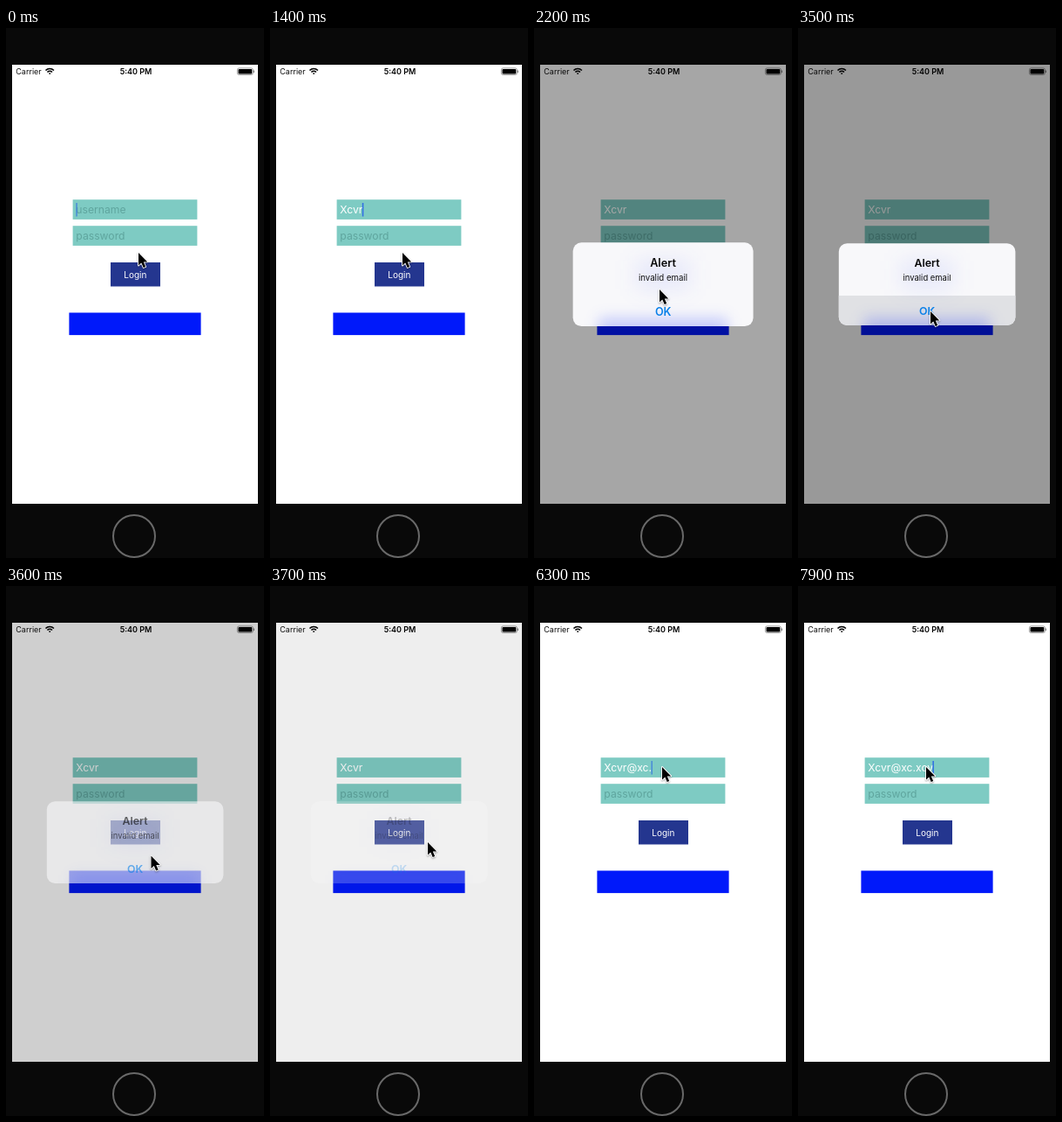
These frames come from a looping animation (296x606 px, 8000 ms). An HTML page with a canvas:

```html
<!DOCTYPE html>
<html lang="en">
<head>
<meta charset="utf-8">
<title>Login form</title>
<style>
html, body { margin: 0; width: 100%; height: 100%; overflow: hidden; background: #090909; }
canvas { display: block; width: 296px; height: 606px; }
</style>
</head>
<body>
<canvas id="stage"></canvas>
<script>
const W = 296, H = 606, LOOP = 8000, STEP = 100;
const canvas = document.getElementById('stage');
const ctx = canvas.getContext('2d');
const dpr = window.devicePixelRatio || 1;
canvas.width = W * dpr;
canvas.height = H * dpr;

const FONT = 'Inter, "Liberation Sans", sans-serif';
const USER = 'Xcvr@xc.xcv';

// Typing comes in bursts of [start, letters], one letter each KEY_GAP ms
const KEY_GAP = 50;
const bursts = [[100, 4], [5600, 1], [5950, 2], [6300, 1], [6600, 3]];
const keyTimes = bursts.flatMap(([start, n]) => Array.from({ length: n }, (_, i) => start + i * KEY_GAP));
const BLUR = 2000, FOCUS = 4400;
const ALERT = { open: 1900, tap: 3400, close: 3500 };

// Pointer stops: time, x, y
const stops = [[1600, 152, 256], [2200, 144, 298], [3500, 152, 323], [3700, 181, 292], [4000, 143, 209], [4200, 147, 206]];

const clamp = v => Math.min(1, Math.max(0, v));
const easeOut = u => 1 - (1 - clamp(u)) ** 3;
const smooth = u => u * u * (3 - 2 * u);

function pointerAt(t) {
  let [, x, y] = stops[0];
  for (let i = 1; i < stops.length; i++) {
    const [from] = stops[i - 1], [to, nx, ny] = stops[i];
    const k = smooth(clamp((t - from) / (to - from)));
    x += (nx - x) * k;
    y += (ny - y) * k;
  }
  return [x, y];
}

// The caret stays lit after a key or focus, then pulses
function caretAlpha(t) {
  if (t >= BLUR && t < FOCUS) return 0;
  const period = 1100;
  const last = Math.max(...[-period, FOCUS, ...keyTimes].filter(k => k <= t));
  return clamp(.5 + 1.2 * Math.cos(2 * Math.PI * (t - last - 250) / period));
}

function rect(color, x, y, w, h) {
  ctx.fillStyle = color;
  ctx.fillRect(x, y, w, h);
}

function pill(x, y, w, h, r) {
  ctx.beginPath();
  ctx.roundRect(x, y, w, h, r);
}

function text(str, x, y, size, color, weight = 400, align = 'left') {
  ctx.font = `${weight} ${size}px ${FONT}`;
  ctx.textAlign = align;
  ctx.fillStyle = color;
  ctx.fillText(str, x, y);
}

function statusBar() {
  text('Carrier', 11.3, 53, 9, '#111');
  text('5:40 PM', 149, 53, 9, '#000', 600, 'center');

  ctx.strokeStyle = '#000';
  ctx.lineWidth = 1.6;
  for (const r of [1, 3.9, 6.7]) {
    ctx.beginPath();
    ctx.arc(50.2, 53.2, r, -Math.PI * .75, -Math.PI * .25);
    ctx.stroke();
  }

  ctx.strokeStyle = '#888';
  ctx.lineWidth = .8;
  pill(265.4, 45.9, 18, 7.6, 2);
  ctx.stroke();
  ctx.fillStyle = '#000';
  pill(266.5, 47, 15.8, 5.4, 1);
  ctx.fill();
  rect('#888', 284, 48.5, 1, 2.5);
}

function form(t) {
  const left = 80.3, hint = '#5fa59e';
  for (const y of [196.2, 226.2]) rect('#7ecbc3', 76.6, y, 142.8, 22.7);
  const value = USER.slice(0, keyTimes.filter(k => k <= t).length);
  text(value || 'username', left, 211.5, 12.2, value ? '#fff' : hint);
  const end = value ? left + ctx.measureText(value).width - .6 : left;
  text('password', left, 241.5, 12.2, hint);

  ctx.globalAlpha = caretAlpha(t);
  rect('#2f6ce5', end, 200, 1.5, 15.5);
  ctx.globalAlpha = 1;

  rect('#24368f', 120, 268, 57, 27.5);
  text('Login', 148.3, 285.5, 10, '#fff', 400, 'center');
  rect('#0019fa', 72.4, 325.5, 151.2, 25.6);
}

// Tint of the form seen through the frosted panel
function glow(color, alpha, blur, x, y, w, h) {
  ctx.save();
  ctx.globalAlpha *= alpha;
  ctx.filter = `blur(${blur * dpr}px)`;
  rect(color, x, y, w, h);
  ctx.restore();
}

function alertBox(alpha, scale, pressed) {
  ctx.save();
  ctx.globalAlpha = alpha;
  ctx.translate(148, 293);
  ctx.scale(scale, scale);
  ctx.translate(-148, -293);
  ctx.save();
  pill(46.8, 246.3, 202.6, 93.7, 9.5);
  ctx.clip();
  rect('#f8f8fa', 46, 246, 204, 95);
  if (pressed) rect('#e0e1e4', 46, 306, 204, 35);
  glow('#3048ff', .09, 13, 118, 266, 60, 32);
  glow('#2038ff', .24, 8, 76, 331, 144, 24);
  ctx.restore();
  text('Alert', 148, 273, 12.4, '#0a0a0a', 600, 'center');
  text('invalid email', 148, 288.6, 9.45, '#111', 400, 'center');
  text('OK', 148.2, 328, 12.4, '#0a80e8', 600, 'center');
  ctx.restore();
}

function popup(t) {
  const show = easeOut((t - ALERT.open) / 600);
  const p = show * (1 - easeOut((t - ALERT.close) / 450));
  if (p <= 0) return;
  rect(`rgba(0,0,0,${.4 * p})`, 7, 42, 282, 502);
  alertBox(clamp(1.3 * p), 1 + .17 * (1 - show), t >= ALERT.tap && t <= ALERT.close);
}

function pointer(x, y) {
  const shape = [[0, 0], [0, 14.5], [3.3, 11.5], [5.7, 17], [8.2, 16], [5.8, 10.6], [10.3, 10.4]];
  ctx.save();
  ctx.translate(x, y + 1);
  ctx.beginPath();
  shape.forEach(([px, py]) => ctx.lineTo(px, py));
  ctx.closePath();
  ctx.shadowColor = 'rgba(0,0,0,.35)';
  ctx.shadowBlur = 2 * dpr;
  ctx.shadowOffsetY = dpr;
  ctx.strokeStyle = '#fff';
  ctx.lineWidth = 1.8;
  ctx.lineJoin = 'round';
  ctx.stroke();
  ctx.shadowColor = 'transparent';
  ctx.fillStyle = '#000';
  ctx.fill();
  ctx.restore();
}

function draw(t) {
  ctx.setTransform(dpr, 0, 0, dpr, 0, 0);
  rect('#090909', 0, 0, W, H);
  rect('#fff', 7, 42, 282, 502);
  ctx.strokeStyle = '#696969';
  ctx.lineWidth = 2;
  ctx.beginPath();
  ctx.arc(147, 581, 24, 0, Math.PI * 2);
  ctx.stroke();
  statusBar();
  form(t);
  popup(t);
  pointer(...pointerAt(t));
}

const start = performance.now();
function tick(now) {
  const t = Math.max(0, now - start) % LOOP;
  draw(Math.floor(t / STEP) * STEP);
  requestAnimationFrame(tick);
}
draw(0);
requestAnimationFrame(tick);
</script>
</body>
</html>
```
